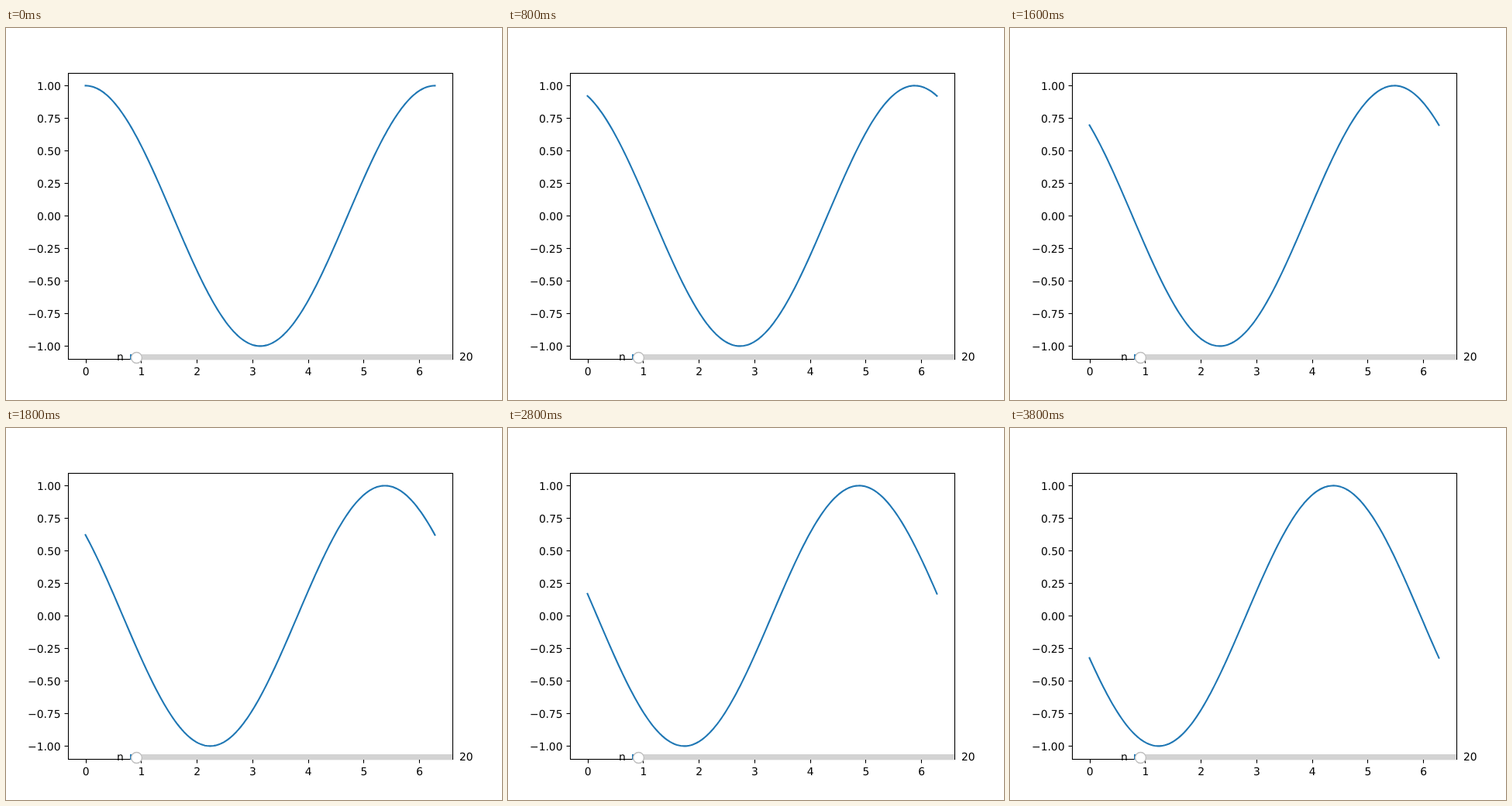
Recreate the animation shown at these times as an HTML page. Size 640x480 px, loop 4000 ms.

```html
<!DOCTYPE html>
<html lang="en">
<head>
<meta charset="utf-8">
<title>Phase-shifted cosine</title>
<style>
  html, body { margin: 0; width: 100%; height: 100%; overflow: hidden; background: #fff; }
  svg { display: block; width: 640px; height: 480px; }
  text { font: 13.89px "DejaVu Sans", sans-serif; text-rendering: geometricPrecision; }
  .axis { fill: none; stroke: #000; stroke-width: 1.11; }
  .curve { fill: none; stroke: #1f77b4; stroke-width: 2.083; stroke-linecap: square; stroke-linejoin: round; }
</style>
</head>
<body>
<svg id="plot" viewBox="0 0 640 480"></svg>
<script>
  const STEP_MS = 200, STEPS = 20, PHASE_STEP = 0.1, POINTS = 200;
  const plot = document.getElementById('plot');
  const toX = v => 102.545 + v * 450.909 / (2 * Math.PI);
  const toY = v => 242.4 - v * 168;

  function add(tag, attrs, content = '') {
    const el = document.createElementNS('http://www.w3.org/2000/svg', tag);
    for (const [key, value] of Object.entries(attrs)) el.setAttribute(key, value);
    el.textContent = content;
    plot.append(el);
    return el;
  }

  const label = (x, y, content, anchor = 'start') =>
    add('text', { x, y, 'text-anchor': anchor }, content);

  // Ticks sit on pixel centres.
  for (let v = 0; v <= 6; v++) {
    const x = Math.round(toX(v)) + 0.5;
    add('path', { class: 'axis', d: `M${x} 427.5V432.5` });
    label(toX(v) + 0.5, 448, v, 'middle');
  }
  for (let v = -1; v <= 1; v += 0.25) {
    const y = Math.round(toY(v));
    add('path', { class: 'axis', d: `M75.5 ${y + 0.5}H80.5` });
    label(v < 0 ? 28 : 40, y + 6, (v < 0 ? '\u2212' : '') + Math.abs(v).toFixed(2));
  }

  const curve = add('path', { class: 'curve' });
  add('rect', { class: 'axis', x: 80.5, y: 58.5, width: 496, height: 369 });

  // Slider
  add('rect', { x: 160, y: 421, width: 416, height: 7, fill: '#d3d3d3' });
  add('rect', { x: 160, y: 421, width: 8, height: 7, fill: '#1f77b4' });
  add('circle', { cx: 168.5, cy: 425.5, r: 6.94, fill: '#fff', stroke: '#bfbfbf', 'stroke-width': 1.39 });
  label(143, 429, 'n');
  label(585, 429, '20');

  function drawCurve(phase) {
    let d = '';
    for (let i = 0; i < POINTS; i++) {
      const v = 2 * Math.PI * i / (POINTS - 1);
      d += `${i ? 'L' : 'M'}${toX(v).toFixed(2)} ${toY(Math.cos(v + phase)).toFixed(2)}`;
    }
    curve.setAttribute('d', d);
  }

  let start, shown;
  function tick(now) {
    start ??= now;
    const step = Math.floor((now - start) / STEP_MS) % STEPS;
    if (step !== shown) drawCurve((shown = step) * PHASE_STEP);
    requestAnimationFrame(tick);
  }
  drawCurve(0);
  requestAnimationFrame(tick);
</script>
</body>
</html>
```
